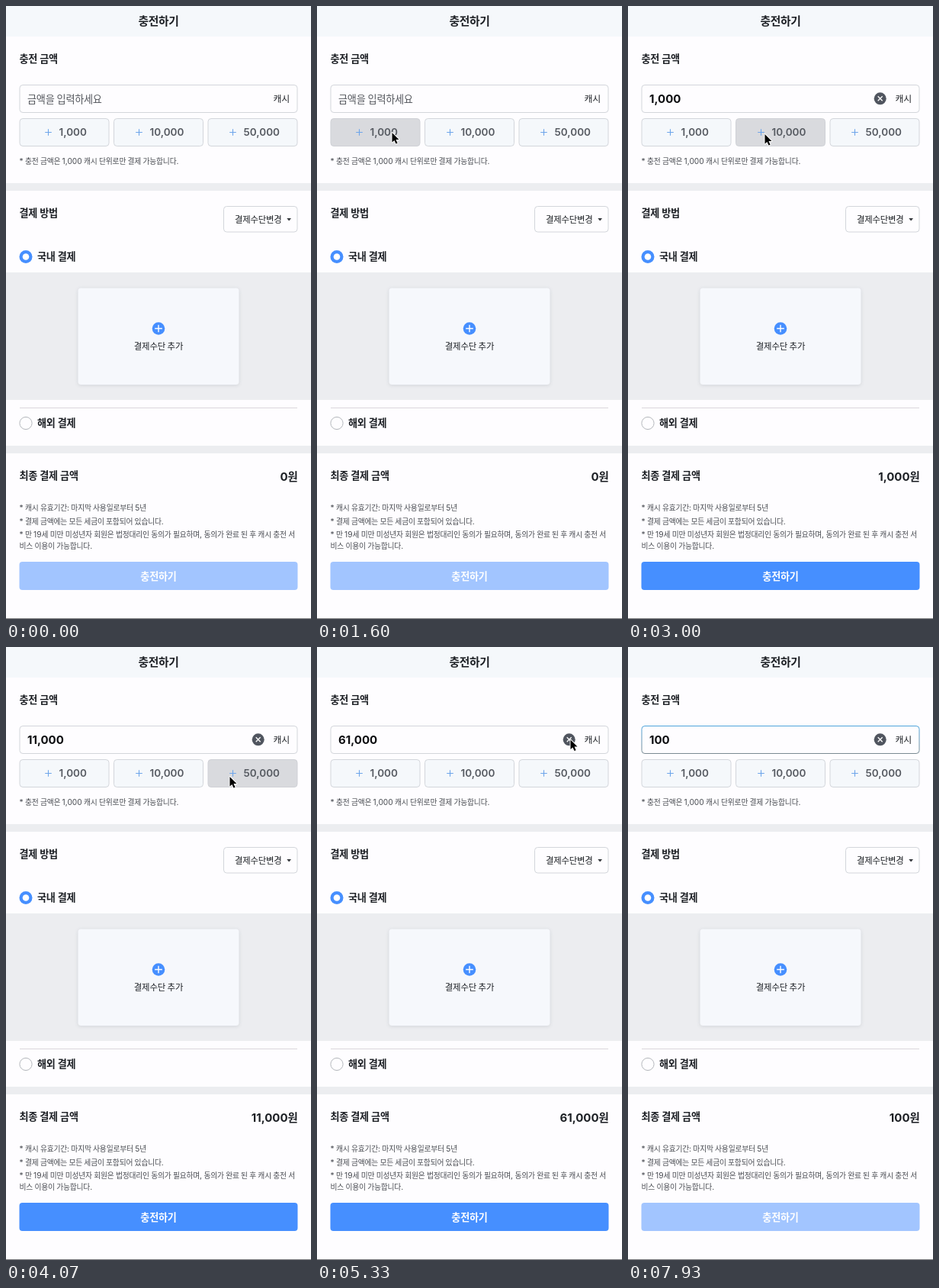
These frames come from a looping animation (400 by 803 pixels, 8 s). An HTML page with a canvas:

```html
<!DOCTYPE html>
<html lang="ko">
<head>
<meta charset="utf-8">
<title>충전하기</title>
<style>
html, body { margin: 0; width: 100%; height: 100%; overflow: hidden; background: #fefdff; }
canvas { display: block; width: 400px; height: 803px; }
</style>
</head>
<body>
<canvas id="stage"></canvas>
<script>
const W = 400, H = 803, LOOP = 8000;
const canvas = document.getElementById('stage');
const ctx = canvas.getContext('2d');
const dpr = window.devicePixelRatio || 1;
canvas.width = W * dpr;
canvas.height = H * dpr;

const BLUE = '#468fff', PALE_BLUE = '#a2c5ff', INK = '#1d2025', NOTE = '#484b51';
const PAGE = '#fefdff', SOFT = '#f5f8fb', BAND = '#ecedf0', EDGE = '#d3d6db';
const HANGUL = '"Noto Sans CJK KR", "Noto Sans CJK", sans-serif';
const LATIN = 'Inter, sans-serif';

const buttons = [
  { x: 18, plus: 55.5, label: '1,000', textX: 69.5 },
  { x: 141.5, plus: 174.5, label: '10,000', textX: 188.5 },
  { x: 265, plus: 297.5, label: '50,000', textX: 311.5 }
];
const BTN = { y: 147.5, w: 117, h: 36 };

// [time, x, y] of the pointer tip
const path = [
  [600, -12, 236], [1250, 98.5, 166],
  [2300, 98.5, 166], [2850, 179.5, 168],
  [3450, 179.5, 168], [3950, 293.5, 170],
  [4450, 293.5, 170], [4925, 332.5, 121.5]
];
// [time, field value]
const values = [
  [0, ''], [2100, '1,000'], [3300, '11,000'], [4330, '61,000'],
  [5400, ''], [6400, '1'], [6600, '10'], [6800, '100']
];
const FOCUS_AT = 5400, TYPE_AT = 6400;

function pointerAt(t) {
  if (t < path[0][0] || t >= TYPE_AT) return null;
  let i = 0;
  while (i < path.length - 1 && path[i + 1][0] <= t) i++;
  const a = path[i], b = path[i + 1] || a;
  const u = a === b ? 0 : (t - a[0]) / (b[0] - a[0]);
  const e = u * u * (3 - 2 * u);
  return { x: a[1] + (b[1] - a[1]) * e, y: a[2] + (b[2] - a[2]) * e };
}

function valueAt(t) {
  return values.filter(v => v[0] <= t).pop()[1];
}

function rect(x, y, w, h, color) {
  ctx.fillStyle = color;
  ctx.fillRect(x, y, w, h);
}

function box(x, y, w, h, fill, stroke, r = 4) {
  ctx.beginPath();
  ctx.roundRect(x, y, w, h, r);
  if (fill) { ctx.fillStyle = fill; ctx.fill(); }
  if (stroke) { ctx.strokeStyle = stroke; ctx.lineWidth = 1; ctx.stroke(); }
}

function disc(x, y, r, color) {
  ctx.fillStyle = color;
  ctx.beginPath();
  ctx.arc(x, y, r, 0, Math.PI * 2);
  ctx.fill();
}

function cross(x, y, r, color, width, turn = 0) {
  ctx.save();
  ctx.translate(x, y);
  ctx.rotate(turn);
  ctx.strokeStyle = color;
  ctx.lineWidth = width;
  ctx.beginPath();
  ctx.moveTo(-r, 0); ctx.lineTo(r, 0);
  ctx.moveTo(0, -r); ctx.lineTo(0, r);
  ctx.stroke();
  ctx.restore();
}

// Splits mixed text so Hangul, Latin and spaces keep their own metrics.
function runs(str, size, weight) {
  return str.match(/[가-힣]+| +|[^가-힣 ]+/g).map(s => {
    if (s[0] === ' ') return { s, width: size * 0.23 * s.length };
    const hangul = /[가-힣]/.test(s);
    const font = `${weight} ${hangul ? size * 0.96 : size}px ${hangul ? HANGUL : LATIN}`;
    const gap = hangul ? `${-0.02 * size}px` : '0px';
    ctx.font = font;
    ctx.letterSpacing = gap;
    return { s, font, gap, width: ctx.measureText(s).width };
  });
}

// y is the vertical middle of the glyphs
function text(str, x, y, size, weight = 400, color = INK, align = 0) {
  const parts = runs(str, size, weight);
  x -= parts.reduce((sum, p) => sum + p.width, 0) * align;
  ctx.fillStyle = color;
  for (const p of parts) {
    if (p.font) {
      ctx.font = p.font;
      ctx.letterSpacing = p.gap;
      ctx.fillText(p.s, x, y + size * 0.36);
    }
    x += p.width;
  }
}

function drawAmount(value, focused, pointer) {
  text('충전 금액', 17.5, 69.5, 13.7, 600);

  let edge = EDGE;
  if (focused) {
    edge = ctx.createLinearGradient(0, 103, 0, 140);
    edge.addColorStop(0, '#4fa5dc');
    edge.addColorStop(1, '#7b8a92');
  }
  box(18, 103.5, 364, 36, PAGE, edge);
  if (value) {
    text(value, 28, 121.5, 15, 700, '#0c0d10');
    disc(330.7, 121.3, 8, '#50555f');
    cross(330.7, 121.3, 4.2, '#fff', 1.3, Math.PI / 4);
  } else {
    text('금액을 입력하세요', 28, 121.8, 13.7, 400, '#53565c');
  }
  text('캐시', 372, 121.5, 12.4, 400, INK, 1);

  for (const b of buttons) {
    const over = pointer && pointer.x >= b.x && pointer.x <= b.x + BTN.w &&
      pointer.y >= BTN.y && pointer.y <= BTN.y + BTN.h;
    box(b.x, BTN.y, BTN.w, BTN.h, over ? '#d9dade' : SOFT, over ? '#cfd1d6' : EDGE);
    cross(b.plus, 165.5, 4.3, '#6ea5ea', 1.1);
    text(b.label, b.textX, 165.5, 13.5, 600, '#565a61');
  }
  text('* 충전 금액은 1,000 캐시 단위로만 결제 가능합니다.', 17.5, 203.7, 10.2, 400, NOTE);
}

function drawMethod() {
  text('결제 방법', 17.5, 271, 13.7, 600);
  box(285.5, 262.5, 96.5, 33.5, PAGE, EDGE);
  text('결제수단변경', 300, 279.5, 11.9);
  ctx.fillStyle = '#33363b';
  ctx.beginPath();
  ctx.moveTo(368.3, 278); ctx.lineTo(374, 278); ctx.lineTo(371.2, 281.4);
  ctx.fill();

  disc(26, 328.5, 8.5, BLUE);
  disc(26, 328.5, 4.3, '#fff');
  text('국내 결제', 41, 328.5, 13.7, 600);

  rect(0, 349, W, 167, BAND);
  ctx.save();
  ctx.shadowColor = 'rgba(60, 70, 90, 0.14)';
  ctx.shadowBlur = 5 * dpr;
  ctx.shadowOffsetY = dpr;
  box(94.5, 369.5, 211, 126.5, '#f6f8fc');
  ctx.restore();
  disc(200, 422.5, 8.3, BLUE);
  cross(200, 422.5, 4.8, '#fff', 1.4);
  text('결제수단 추가', 200, 445.5, 11.9, 500, INK, 0.5);

  rect(18, 526, 364, 1, '#dad7db');
  ctx.strokeStyle = '#b4b7bc';
  ctx.lineWidth = 1;
  ctx.beginPath();
  ctx.arc(26, 546.5, 8.1, 0, Math.PI * 2);
  ctx.stroke();
  text('해외 결제', 41, 546.3, 13.7, 600);
}

function drawTotal(value) {
  text('최종 결제 금액', 17.5, 615.5, 13.7, 600);
  text((value || '0') + '원', 382.5, 617, 15, 700, INK, 1);
  [
    ['* 캐시 유효기간: 마지막 사용일로부터 5년', 657.5],
    ['* 결제 금액에는 모든 세금이 포함되어 있습니다.', 675.3],
    ['* 만 19세 미만 미성년자 회원은 법정대리인 동의가 필요하며, 동의가 완료 된 후 캐시 충전 서', 692.8],
    ['비스 이용이 가능합니다.', 707.3]
  ].forEach(([line, y]) => text(line, 17.5, y, 10.2, 400, NOTE));

  const ready = Number(value.replace(',', '')) >= 1000;
  box(17.5, 728, 365, 37, ready ? BLUE : PALE_BLUE);
  text('충전하기', 200, 746.7, 13.7, 600, '#fff', 0.5);
}

function drawPointer({ x, y }) {
  ctx.save();
  ctx.translate(x, y);
  ctx.beginPath();
  [[0, 0], [0, 12.6], [2.9, 9.9], [5, 14.6], [7.1, 13.7], [5, 9.1], [9, 9]]
    .forEach(([px, py]) => ctx.lineTo(px, py));
  ctx.closePath();
  ctx.lineJoin = 'round';
  ctx.strokeStyle = '#fff';
  ctx.lineWidth = 1.8;
  ctx.stroke();
  ctx.fillStyle = '#000';
  ctx.fill();
  ctx.restore();
}

function draw(t) {
  const value = valueAt(t), pointer = pointerAt(t);
  ctx.setTransform(dpr, 0, 0, dpr, 0, 0);
  rect(0, 0, W, H, PAGE);
  rect(0, 0, W, 40, SOFT);
  rect(0, 232, W, 10, BAND);
  rect(0, 576, W, 10, BAND);
  rect(0, 802, W, 1, '#77787b');
  text('충전하기', 200, 19, 15.4, 600, INK, 0.5);
  drawAmount(value, t >= FOCUS_AT, pointer);
  drawMethod();
  drawTotal(value);
  if (pointer) drawPointer(pointer);
}

const start = performance.now();
function tick() {
  draw((performance.now() - start) % LOOP);
  requestAnimationFrame(tick);
}
tick();
</script>
</body>
</html>
```
